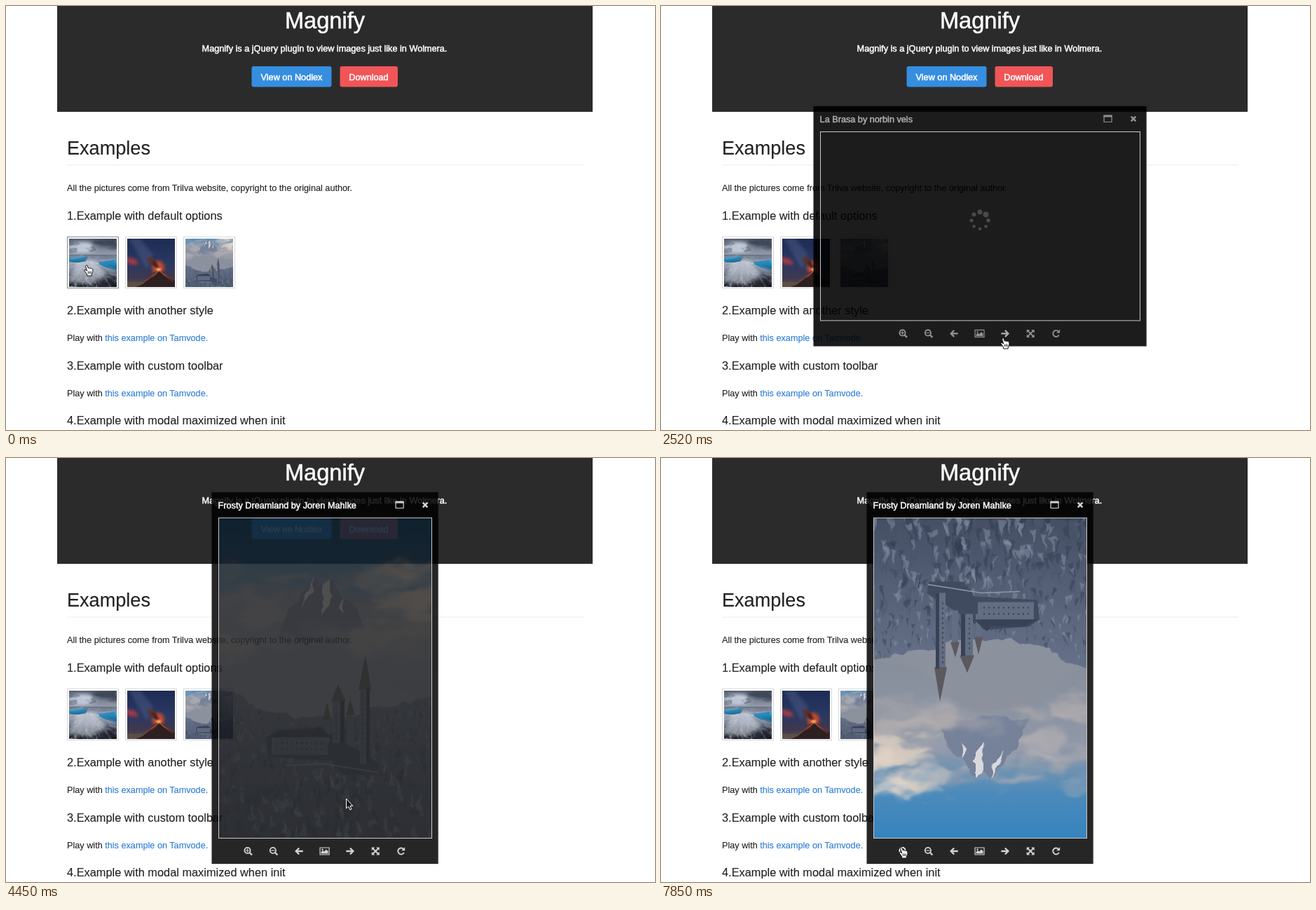
Animation of 926 by 605 pixels, one loop 8 s. Source, as an HTML page:

```html
<!DOCTYPE html>
<html lang="en">
<head>
<meta charset="utf-8">
<title>Magnify</title>
<style>
html, body { margin: 0; width: 100%; height: 100%; overflow: hidden; background: #fff; }
svg { display: block; }
text { font: 12.68px "Liberation Sans", Arial, sans-serif; fill: #222; stroke: #222; stroke-width: .12px; }
.h1 { font-size: 32.6px; fill: #fff; stroke: #fff; stroke-width: .5px; }
.h2 { font-size: 27.1px; }
.h4 { font-size: 16.35px; }
.link { fill: #2a7bd6; stroke: #2a7bd6; }
.bold { fill: #fff; stroke: #fff; stroke-width: .5px; }
.mid { text-anchor: middle; }
.thumb rect { fill: #fff; stroke: #d8d8d8; }
.icon { fill: none; stroke: currentColor; stroke-width: 1.9; color: #d2d2d2; }
.icon.hot { color: #fff; }
.icon .solid { fill: currentColor; stroke: none; }
.icon .thin { stroke-width: 1.2; }
</style>
</head>
<body>
<svg id="stage" width="926" height="605" viewBox="0 0 926 605">
  <defs>
    <filter id="soft" x="-50%" y="-50%" width="200%" height="200%"><feGaussianBlur stdDeviation="10"/></filter>
    <filter id="haze" x="-50%" y="-50%" width="200%" height="200%"><feGaussianBlur stdDeviation="4"/></filter>
    <filter id="cloudy" x="-10%" y="-10%" width="120%" height="120%">
      <feTurbulence type="fractalNoise" baseFrequency=".02 .035" numOctaves="3" seed="4" result="noise"/>
      <feGaussianBlur in="SourceGraphic" stdDeviation="4"/>
      <feDisplacementMap in2="noise" scale="45" xChannelSelector="R" yChannelSelector="G"/>
    </filter>
    <filter id="rough" x="-10%" y="-10%" width="120%" height="120%">
      <feTurbulence type="fractalNoise" baseFrequency=".05" numOctaves="2" seed="9" result="noise"/>
      <feDisplacementMap in="SourceGraphic" in2="noise" scale="16" xChannelSelector="R" yChannelSelector="G"/>
    </filter>
    <linearGradient id="storm" x2="0" y2="1">
      <stop offset="0" stop-color="#525b6d"/><stop offset=".6" stop-color="#7a8496"/><stop offset="1" stop-color="#949cab"/>
    </linearGradient>
    <linearGradient id="sea" x2="0" y2="1">
      <stop offset="0" stop-color="#667083"/><stop offset=".25" stop-color="#929bab"/>
      <stop offset=".5" stop-color="#6f788a"/><stop offset=".75" stop-color="#353b47"/><stop offset="1" stop-color="#171a21"/>
    </linearGradient>
    <linearGradient id="ice" x2=".4" y2="1">
      <stop offset="0" stop-color="#45a3d0"/><stop offset=".5" stop-color="#2685b7"/><stop offset="1" stop-color="#2a7299"/>
    </linearGradient>
    <linearGradient id="night" x2="0" y2="1">
      <stop offset="0" stop-color="#1d2c55"/><stop offset=".5" stop-color="#2b3861"/>
      <stop offset=".8" stop-color="#3d3850"/><stop offset="1" stop-color="#574b42"/>
    </linearGradient>
    <linearGradient id="day" x2="0" y2="1">
      <stop offset="0" stop-color="#3684bd"/><stop offset=".14" stop-color="#4b8abb"/>
      <stop offset=".28" stop-color="#8f98a8"/><stop offset=".6" stop-color="#858c99"/>
    </linearGradient>
    <linearGradient id="wood" x2="0" y2="1">
      <stop offset="0" stop-color="#67728a"/><stop offset="1" stop-color="#414b60"/>
    </linearGradient>

    <symbol id="ocean" viewBox="0 0 455 265" preserveAspectRatio="xMidYMid slice">
      <rect width="455" height="88" fill="url(#storm)"/>
      <ellipse cx="165" cy="48" rx="85" ry="30" fill="#c3ccd9" filter="url(#soft)"/>
      <ellipse cx="345" cy="22" rx="125" ry="22" fill="#3b4352" filter="url(#soft)"/>
      <g id="clouds" filter="url(#cloudy)"/>
      <rect y="87" width="455" height="178" fill="url(#sea)"/>
      <path d="M150 110L230 110 300 200 215 250 90 235 130 160Z" fill="#d6dbe5" opacity=".55" filter="url(#soft)"/>
      <path d="M0 130L100 125 60 170 0 180ZM0 215L80 195 60 265H0ZM300 215L455 190V265H320Z" fill="#161920" opacity=".5" filter="url(#soft)"/>
      <g id="foam" fill="none" stroke="#dfe4ee" stroke-linecap="round" filter="url(#rough)"/>
      <g fill="url(#ice)">
        <path d="M87 119L98 108 115 104 135 101 160 102 182 98 190 101 197 109 187 124 150 131 110 129Z"/>
        <path d="M257 128L300 121 345 115 380 103 405 100 416 115 432 150 430 172 415 181 360 172 300 158 264 141Z"/>
      </g>
      <path d="M98 108L135 101 182 98 150 108 112 113ZM345 115L380 103 405 100 390 122 350 135Z" fill="#62b6d9" opacity=".4"/>
      <path d="M90 122L150 121 187 118 150 130 110 128ZM300 140L360 150 428 152 428 172 360 170Z" fill="#1b5f84" opacity=".4"/>
    </symbol>

    <symbol id="volcano" viewBox="0 0 455 303" preserveAspectRatio="xMidYMid slice">
      <rect width="455" height="303" fill="url(#night)"/>
      <g filter="url(#soft)">
        <path d="M90 0L160 0 240 100 200 190Z" fill="#56648c" opacity=".4"/>
        <path d="M50 112L130 128 150 165 90 158Z" fill="#a33a46"/>
        <ellipse cx="272" cy="180" rx="38" ry="42" fill="#c24a30"/>
      </g>
      <g id="stars" fill="#cdd6ee"/>
      <path d="M270 187L238 168 205 135 204 118 226 119 250 130 262 148 268 165 280 182Z" fill="#5e3029" filter="url(#haze)"/>
      <path d="M235 135L258 150 272 188 245 168Z" fill="#2e1d1c" opacity=".7" filter="url(#haze)"/>
      <rect y="270" width="455" height="33" fill="#6b5946" opacity=".5"/>
      <path d="M130 303L175 285 215 246 262 201 277 197 291 202 340 240 376 261 402 257 432 264 455 273V303Z" fill="#2c2020"/>
      <g id="lava" fill="none"/>
      <path d="M376 261L402 257 432 264 455 273V303H340Z" fill="#2b2525"/>
      <ellipse cx="275" cy="193" rx="15" ry="10" fill="#ffad62" filter="url(#haze)"/>
    </symbol>

    <symbol id="castle" viewBox="0 0 303 456" preserveAspectRatio="xMidYMid slice">
      <rect width="303" height="456" fill="url(#day)"/>
      <g id="highClouds" filter="url(#cloudy)"/>
      <g filter="url(#rough)">
        <path d="M80 172L103 118 120 106 137 82 150 94 158 86 175 112 190 122 220 172Z" fill="#76829a"/>
        <path d="M137 82L132 108 118 128 124 106ZM158 86L158 122 146 140 150 96ZM175 112L180 138 170 124Z" fill="#d9d8dc"/>
      </g>
      <g id="lowClouds" filter="url(#cloudy)"/>
      <path d="M0 255Q30 215 95 188T200 205T303 255V310H0Z" fill="#8b919d" filter="url(#haze)"/>
      <path d="M-20 242L25 250 60 272 125 285 190 283 235 268 325 250V476H-20Z" fill="url(#wood)" filter="url(#rough)"/>
      <g id="trees" filter="url(#rough)"/>
      <path d="M67 312L82 302 145 297 228 350 224 366 175 366 160 345 70 340Z" fill="#414b60"/>
      <path d="M75 312H155V337H75ZM162 260H179V320H162ZM201 242H215V350H201ZM150 285H158V320H150ZM183 278H192V325H183Z" fill="#636d81"/>
      <path d="M160 261L170 236 181 261ZM199 244L209 195 217 244ZM148 287L154 262 160 287ZM181 280L187 258 194 280Z" fill="#5b585e"/>
      <path d="M70 312L88 302H150L160 312ZM130 310L142 295 154 310ZM173 260H179V320H173ZM210 242H215V350H210Z" fill="#384155"/>
      <path d="M82 320H150M82 329H150M205 250V340M167 270V315" stroke="#343d50" stroke-width="2" stroke-dasharray="2 5"/>
      <path d="M95 352L150 350 226 362" fill="none" stroke="#8f98aa" stroke-width="1.500"/>
    </symbol>
  </defs>

  <rect width="926" height="605" fill="#fff"/>
  <rect x="73" width="764" height="151" fill="#2b2b2b"/>
  <text class="h1 mid" x="455" y="32">Magnify</text>
  <text class="bold mid" x="454.5" y="64.5">Magnify is a jQuery plugin to view images just like in Wolmera.</text>
  <rect x="350.500" y="86" width="114" height="29.500" rx="3" fill="#368ee0"/>
  <text class="bold mid" x="407.500" y="105.500">View on Nodlex</text>
  <rect x="476.500" y="86" width="82.500" height="29.500" rx="3" fill="#f05557"/>
  <text class="bold mid" x="517.500" y="105.500">Download</text>

  <text class="h2" x="87" y="212">Examples</text>
  <path d="M87 227H824" stroke="#ececec"/>
  <text x="87" y="264">All the pictures come from Trilva website, copyright to the original author.</text>
  <text class="h4" x="87" y="305">1.Example with default options</text>
  <g id="thumbs"></g>
  <text class="h4" x="87" y="440">2.Example with another style</text>
  <text x="87" y="478">Play with <tspan class="link">this example on Tamvode.</tspan></text>
  <text class="h4" x="87" y="519">3.Example with custom toolbar</text>
  <text x="87" y="557">Play with <tspan class="link">this example on Tamvode.</tspan></text>
  <text class="h4" x="87" y="597">4.Example with modal maximized when init</text>

  <g id="modal">
    <rect id="panel" stroke="#000" stroke-opacity=".12" stroke-width="2"/>
    <use id="photo"/>
    <rect id="frame" fill="none" stroke="#c8c8c8"/>
    <g id="spinner" fill="#4a4a4a"></g>
    <g id="controls">
      <text id="title" class="bold"></text>
      <g id="max" class="icon"><path class="thin" d="M-5.500-4.500H5.500V4.500H-5.500Z"/><path d="M-6-4H6" stroke-width="3"/></g>
      <g id="close" class="icon"><path d="M-3.300-3.300L3.300 3.300M3.300-3.300L-3.300 3.300" stroke-width="2.600"/></g>
      <g id="tools"></g>
    </g>
  </g>
  <g id="cursor" stroke-linejoin="round">
    <path id="arrow" d="M.500 0V14L3.600 11.200 5.800 16 8 15 5.900 10.400H9.700Z" fill="#111" stroke="#fff"/>
    <g id="hand">
      <path d="M4 .800C2.600 1 2.700 2.600 3 3.800L4.700 9 3 7.700C1.500 6.700.300 7.600 1.200 9L4.600 13.800V16H11.200V14C13 11.500 13.200 8.800 12.600 6.700 12 5.200 10.900 5.400 10.600 6 10 4.700 8.700 4.800 8.300 5.500 7.700 4.500 6.600 4.500 6.300 5.200L5.300 1.800Q5 .800 4 .800Z" fill="#fff" stroke="#111"/>
      <path d="M6.300 9.500V13M8.300 9.500V13M10.200 9.500V13" stroke="#111" stroke-width=".9"/>
    </g>
  </g>
</svg>
<script>
const $ = id => document.getElementById(id);
const set = (id, attrs) => { for (const a in attrs) $(id).setAttribute(a, attrs[a]); };
const repeat = (n, fn) => Array.from({ length: n }, (_, i) => fn(i)).join('');

let seed = 7;
const rnd = (a = 0, b = 1) => {
  seed = (seed * 16807) % 2147483647;
  return +(a + (b - a) * seed / 2147483647).toFixed(2);
};

// Picture details
const puffs = (n, x, y, w, h, size, colors) => repeat(n, i =>
  `<ellipse cx="${x + rnd(0, w)}" cy="${y + rnd(0, h)}" rx="${rnd(size, size * 2)}" ry="${rnd(size / 4, size / 1.6)}"
    fill="${colors[i % colors.length]}" opacity="${rnd(.35, .8)}"/>`);

$('clouds').innerHTML = puffs(14, 0, 5, 240, 65, 20, ['#8f99aa', '#5a6375', '#c0c9d6'])
  + puffs(12, 240, 5, 215, 65, 22, ['#434b5b', '#6b7588', '#525b6c']);

$('highClouds').innerHTML = puffs(18, 0, 70, 220, 70, 22, ['#a3a5ae', '#b4b0b2', '#949dad'])
  + puffs(16, 225, 65, 75, 95, 20, ['#e2d2c5', '#d5c7be', '#e9dacb']);

$('lowClouds').innerHTML = puffs(22, 0, 150, 303, 50, 24, ['#a7a5aa', '#959aa5', '#b5afb0']);

$('foam').innerHTML = repeat(300, () => {
  const a = rnd(-.05, 3.19), r = rnd(5, 160), len = rnd(15, 65);
  const at = (d, bend) => `${195 + Math.cos(a + bend) * d * 1.6} ${122 + Math.sin(a + bend) * d}`;
  return `<path d="M${at(r, 0)}Q${at(r + len / 2, rnd(-.15, .15))} ${at(r + len, rnd(-.15, .15))}"
    stroke-width="${rnd(.5, 1 + r / 45)}" opacity="${rnd(.2, .75)}"/>`;
}) + repeat(45, i => `<path d="M${rnd(0, 440)} ${rnd(93, 115)}h${rnd(15, 70)}"
    stroke="${i % 2 ? '#dfe4ee' : '#4b5466'}" stroke-width="1.2" opacity=".5"/>`);

$('stars').innerHTML = repeat(110, () =>
  `<circle cx="${rnd(0, 455)}" cy="${rnd(0, 230)}" r="${rnd(.3, .9)}" opacity="${rnd(.3, .9)}"/>`);

$('lava').innerHTML = repeat(42, i => {
  const side = i % 2 ? 1 : -1, w = rnd(8, 100), h = w * rnd(.62, .85) + (w < 45 ? rnd(0, 18) : 0);
  return `<path d="M${277 + side * rnd(1, 8)} 200q${side * w * .35} ${h * .5} ${side * w} ${h}"
    stroke="${i % 3 ? '#c8442c' : '#ff8a55'}" stroke-width="${rnd(.5, 1.4)}" opacity="${rnd(.4, .9)}"/>`;
});

$('trees').innerHTML = repeat(520, i => {
  const x = rnd(-5, 308), edge = Math.min(x, 303 - x) / 150, y = rnd(250 + 45 * edge, 450), h = 6 + (y - 240) / 14;
  return `<path d="M${x} ${y}l${h / 4} ${h}h${-h / 2}Z" fill="${['#333d51', '#8691a5', '#4a556a'][i % 3]}" opacity=".5"/>`;
});

// Page and modal parts
const slides = [
  { start: 0, id: 'ocean', w: 455, h: 265, fade: .4, title: 'Drifting Home by Colby Varne' },
  { start: 15, id: 'volcano', w: 455, h: 303, fade: .55, title: 'La Brasa by norbin vels' },
  { start: 25, id: 'castle', w: 303, h: 456, fade: .23, title: 'Frosty Dreamland by Joren Mahlke' }
];

$('thumbs').innerHTML = slides.map((s, i) => `<g class="thumb" transform="translate(${87 + i * 83} 329)">
  <rect x=".5" y=".5" width="73" height="73"/><use href="#${s.id}" x="3" y="3" width="68" height="69"/></g>`).join('');
const hovered = document.querySelector('.thumb rect');

$('spinner').innerHTML = repeat(8, i => {
  const a = i * Math.PI / 4 - 3 * Math.PI / 4;
  return `<circle cx="${Math.cos(a) * 12}" cy="${Math.sin(a) * 12}" r="${[3, 3.5, 4, 2.8, 2.3, 2.2, 2.2, 2.6][i]}"/>`;
});

const lens = '<circle cx="-1" cy="-1" r="4.100"/><path d="M2 2L5.500 5.500" stroke-width="2.400"/>';
const arrow = '<path d="M-5.500 0H3.500M0-4.500L4.500 0 0 4.500" stroke-width="2.300"/>';
$('tools').innerHTML = [
  lens + '<path class="thin" d="M-3.500-1H1.500M-1-3.500V1.500"/>',
  lens + '<path class="thin" d="M-3.500-1H1.500"/>',
  `<g transform="scale(-1 1)">${arrow}</g>`,
  '<path class="thin" d="M-6.500-5H6.500V5H-6.500Z"/><path class="solid" d="M-5 3.500V1L-2.500-1-.500.500 2.500-2.500 5 0V3.500Z"/><circle class="solid" cx="-3" cy="-2.300" r="1.200"/>',
  arrow,
  '<path d="M-4-4L4 4M4-4L-4 4"/><path class="solid" d="M-5.500-5.500H-1L-5.500-1ZM5.500-5.500V-1L1-5.500ZM5.500 5.500H1L5.500 1ZM-5.500 5.500V1L-1 5.500Z"/>',
  '<path d="M3.300-3.300A4.500 4.500 0 1 0 4.200 2"/><path class="solid" d="M5.500-5.800V-.800H.500Z"/>'
].map(shape => `<g class="icon">${shape}</g>`).join('');
const tools = [...$('tools').children];

// Cursor stops: step, x, y, hand
const stops = [
  [-1, 111, 369, 1], [2, 111, 369, 1], [7, 416, 341, 0], [13, 484, 473, 1], [19, 484, 473, 1],
  [22, 485, 486, 1], [24, 485, 486, 1], [25, 485, 486, 0], [28, 485, 486, 0], [32, 559, 571, 1],
  [34, 559, 566, 1], [41, 559, 566, 1], [42, 559, 565, 1], [46, 559, 565, 1], [49, 420, 571, 0], [51, 339, 555, 1]
];

function cursorAt(k) {
  const i = Math.max(1, stops.findIndex(s => s[0] >= k));
  const a = stops[i - 1], b = stops[i], p = (k - a[0]) / (b[0] - a[0]);
  const hand = p === 1 ? b[3] : p === 0 ? a[3] : a[3] && b[3];
  return { x: a[1] + (b[1] - a[1]) * p, y: a[2] + (b[2] - a[2]) * p, hand };
}

function drawModal(k, cursor) {
  const i = slides.findLastIndex(s => s.start <= k);
  $('modal').style.display = i < 0 ? 'none' : '';
  if (i < 0) return;
  const s = slides[i], from = slides[i - 1] || { w: 300, h: 246 }, n = k - s.start;
  const p = [.09, .6, .99][n] ?? 1;
  const W = from.w + (s.w - from.w) * p + 20, H = from.h + (s.h - from.h) * p + 74;
  const x = 455.1 - W / 2, y = Math.floor(314.5 - H / 2);

  set('panel', { x, y, width: W, height: H, 'fill-opacity': n ? .85 : .89 });
  set('frame', { x: Math.floor(x + 9.5) + .5, y: y + 36.5, width: W - 19, height: H - 73 });
  const turn = k < 36 ? 0 : k < 44 ? 90 : 180, zoom = turn === 90 ? s.w / s.h : 1;
  set('photo', {
    href: '#' + s.id, width: s.w, height: s.h,
    opacity: n < 3 ? 0 : [s.fade, .75][n - 3] ?? 1,
    transform: `translate(455.5 314.5) rotate(${turn}) scale(${zoom}) translate(${-s.w / 2} ${-s.h / 2})`
  });
  set('spinner', { transform: `translate(455 306) rotate(${n * 45})`, opacity: n < 3 ? 1 : 0 });
  set('controls', { opacity: [.65, .85][n] ?? 1 });
  set('title', { x: x + 9, y: y + 22.5 });
  $('title').textContent = s.title;
  set('max', { transform: `translate(${x + W - 55} ${y + 18})` });
  set('close', { transform: `translate(${x + W - 18.5} ${y + 18})` });
  tools.forEach((tool, j) => {
    const tx = 345.5 + j * 36.35;
    tool.setAttribute('transform', `translate(${tx} ${y + H - 18})`);
    tool.classList.toggle('hot', !!cursor.hand && Math.abs(cursor.x + 5 - tx) < 8);
  });
}

let shown;
const begin = performance.now();
function tick() {
  const t = (performance.now() - begin) % 8000;
  const k = Math.min(51, Math.max(-1, Math.floor((t - 291) / 148.1)));
  if (k !== shown) {
    shown = k;
    const c = cursorAt(k);
    set('cursor', { transform: `translate(${c.x} ${c.y})` });
    $('hand').style.display = c.hand ? '' : 'none';
    $('arrow').style.display = c.hand ? 'none' : '';
    hovered.style.stroke = k < 3 ? '#858a90' : '';
    drawModal(k, c);
  }
  requestAnimationFrame(tick);
}
tick();
</script>
</body>
</html>
```
